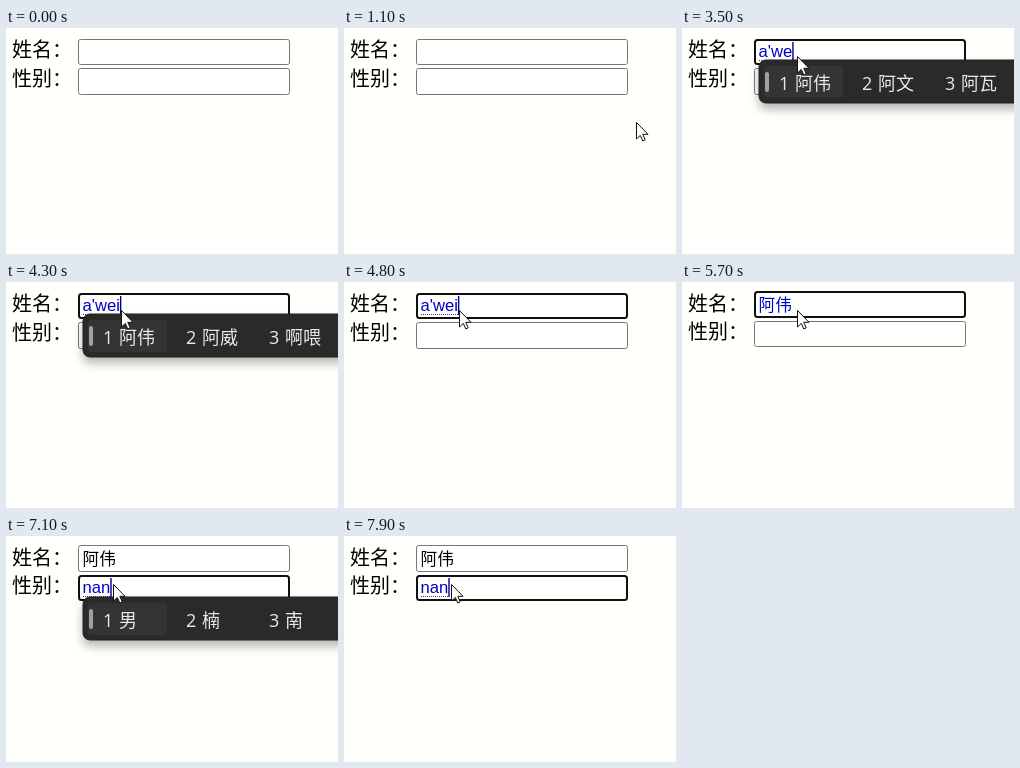
Animation of 332x226 px, one loop 8 s. Source, as an HTML page:

```html
<!DOCTYPE html>
<html lang="zh-CN">
<head>
<meta charset="utf-8">
<title>Form typing</title>
<style>
  html, body { margin: 0; width: 332px; height: 226px; overflow: hidden; background: #fffffb; }
  svg { display: block; }
  .label { font: 20px "Noto Sans CJK SC", "Noto Sans CJK", sans-serif; fill: #000; }
  .value { font: 16.67px "Liberation Sans", "Noto Sans CJK SC", "Noto Sans CJK", sans-serif; }
  .ime text { font: 18px "Open Sans", "Noto Sans CJK SC", "Noto Sans CJK", sans-serif; fill: #e9e9e9; }
  .box { fill: #fffffd; }
  .under { stroke: #3a3a90; stroke-dasharray: 1 1; }
</style>
</head>
<body>
<svg width="332" height="226" viewBox="0 0 332 226">
  <defs>
    <filter id="shadow" x="-20%" y="-50%" width="140%" height="220%">
      <feDropShadow dx="0" dy="6" stdDeviation="5" flood-color="#000" flood-opacity=".28"/>
    </filter>
  </defs>
  <text class="label" x="6" y="29">姓名：</text>
  <text class="label" id="label2" x="6">性别：</text>
  <g class="field"></g>
  <g class="field"></g>
  <g class="ime" id="ime">
    <rect x="77" y="0" width="290" height="43" rx="7" fill="#2a2a2a" stroke="#202020" filter="url(#shadow)"/>
    <rect x="82" y="6" width="79" height="32" rx="4" fill="#343434"/>
    <rect x="83" y="12" width="4" height="20" rx="2" fill="#a0a0a0"/>
  </g>
  <path id="arrow" d="M.5 .5V17L4.3 13.4L6.8 19L9.2 17.9L6.8 12.3H12Z" fill="#fff" stroke="#111"/>
  <path id="beam" d="M-3 -7.5H-1.5L.5 -6.5L2.5 -7.5H4M.5 -6.5V6.5M-3 7.5H-1.5L.5 6.5L2.5 7.5H4" fill="none" stroke="#111"/>
</svg>
<script>
const LOOP = 8000, COMMIT = 4900, FOCUS = [2400, 6400];
const $ = id => document.getElementById(id);

function add(parent, tag, attrs) {
  const el = document.createElementNS("http://www.w3.org/2000/svg", tag);
  set(el, attrs);
  return parent.appendChild(el);
}
function set(el, attrs) {
  for (const k in attrs) el.setAttribute(k, attrs[k]);
}
const show = (el, on) => { el.style.display = on ? "" : "none"; };

// time, text
const typing = [
  [[0, ""], [3100, "a"], [3300, "a'w"], [3500, "a'we"], [3700, "a'wei"], [COMMIT, "阿伟"]],
  [[0, ""], [6700, "n"], [6850, "na"], [7000, "nan"]]
];
// time, panel top, candidates
const panels = [
  [0], [3300, 32, "阿伟", "阿文", "阿瓦"], [3700, 32, "阿伟", "阿威", "啊喂"],
  [4700], [6900, 61, "男", "楠", "南"], [7700]
];
// time, x, y
const path = [
  [0, 317, 114], [1000, 317, 114], [1100, 292, 94], [1300, 280, 88],
  [2000, 115, 28], [6000, 115, 28], [6300, 107, 48], [LOOP, 107, 48]
];
// time, pointer shape
const shapes = [[0, ""], [100, "arrow"], [1900, "beam"], [3100, "arrow"], [6000, "beam"], [6700, "arrow"]];

const at = (steps, t) => steps.filter(s => s[0] <= t).pop();

const fields = [...document.querySelectorAll(".field")].map(g => ({
  box: add(g, "rect", { class: "box" }),
  text: add(g, "text", { class: "value", x: 76.5 }),
  under: add(g, "line", { class: "under", x1: 77 }),
  caret: add(g, "rect", { width: 1.4, height: 19 })
}));

const words = [0, 1, 2].map(i => {
  add($("ime"), "text", { x: 97 + i * 83, y: 30 }).textContent = i + 1;
  return add($("ime"), "text", { x: 113 + i * 83, y: 30 });
});

function pointer(t) {
  const i = Math.max(1, path.findIndex(p => p[0] > t));
  const [t0, x0, y0] = path[i - 1], [t1, x1, y1] = path[i];
  const u = (t - t0) / (t1 - t0), e = u * u * (3 - 2 * u);
  return [Math.round(x0 + (x1 - x0) * e), Math.round(y0 + (y1 - y0) * e)];
}

function drawField(i, t, hover) {
  const f = fields[i], shifted = t >= COMMIT;
  const [top, bottom] = [shifted ? [9, 36] : [11, 37], shifted ? [39, 65] : [40, 67]][i];
  const focused = t >= FOCUS[i] && (i || t < FOCUS[1]);
  const w = focused ? 2 : 1;
  set(f.box, {
    x: 72 + w / 2, y: top + w / 2, width: 212 - w, height: bottom - top - w, rx: focused ? 2.5 : 2,
    stroke: focused ? "#101010" : hover ? "#454545" : "#767676", "stroke-width": w
  });

  const [since, str] = at(typing[i], t);
  const composing = str && /[a-z]/.test(str);
  const base = i ? 57 : 29;
  if (f.text.textContent !== str) f.text.textContent = str;
  set(f.text, { y: base, fill: str && focused ? "#0000c8" : "#000" });

  const end = 76.5 + (str ? f.text.getComputedTextLength() : 0);
  show(f.under, composing);
  set(f.under, { x2: end, y1: base + 3.5, y2: base + 3.5 });
  const blink = (t - Math.max(since, FOCUS[i])) % 1000 < 500;
  show(f.caret, focused && (composing || blink));
  set(f.caret, { x: end, y: base - 15, fill: composing ? "#000090" : "#000" });
}

function draw(t) {
  const [x, y] = pointer(t);
  const shape = at(shapes, t)[1];
  show($("arrow"), shape === "arrow");
  show($("beam"), shape === "beam");
  set($("arrow"), { transform: `translate(${x} ${y})` });
  set($("beam"), { transform: `translate(${x + 2} ${y + 1})` });

  set($("label2"), { y: t < COMMIT ? 58 : 57 });
  drawField(0, t, shape === "beam" && y < 38);
  drawField(1, t, shape === "beam" && y >= 39);

  const [, top, ...list] = at(panels, t);
  show($("ime"), list.length);
  if (list.length) {
    set($("ime"), { transform: `translate(0 ${top})` });
    words.forEach((w, i) => { w.textContent = list[i]; });
  }
}

function tick() {
  draw(performance.now() % LOOP);
  requestAnimationFrame(tick);
}
tick();
</script>
</body>
</html>
```
